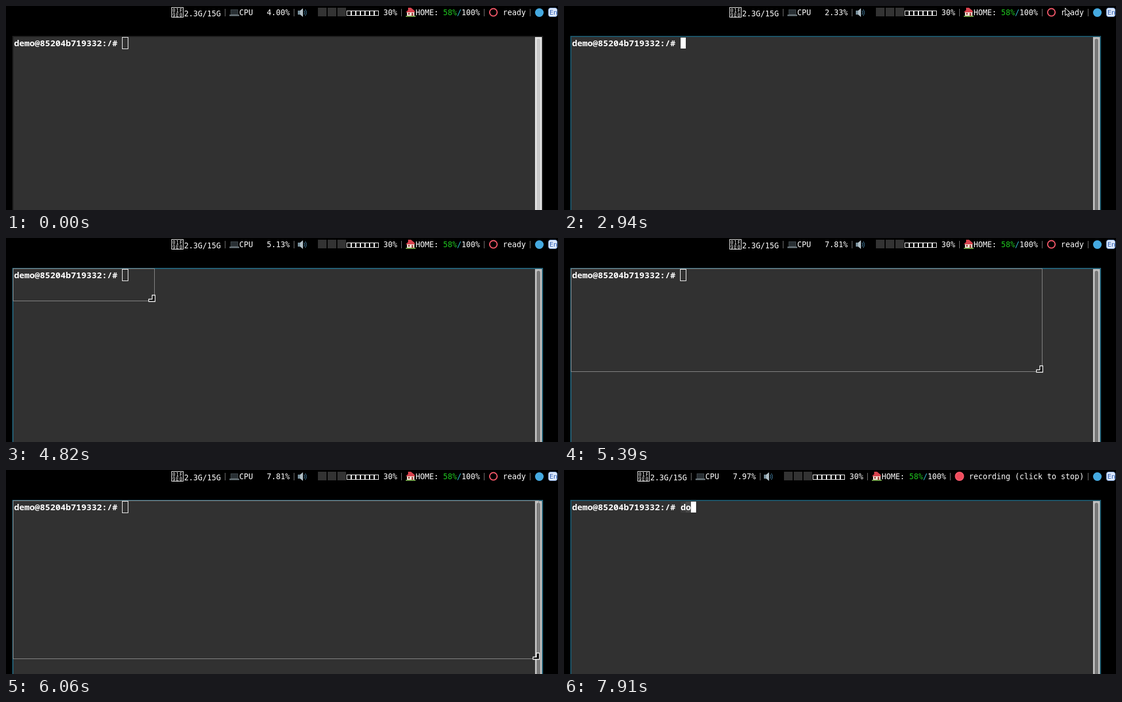
Animation, 961 px wide and 355 px high, one loop 8 s. Source, as an HTML page:

```html
<!DOCTYPE html>
<html lang="en">
<head>
<meta charset="utf-8">
<title>Terminal recording</title>
<style>
html, body { margin: 0; width: 100%; height: 100%; overflow: hidden; background: #000; }
svg { display: block; width: 961px; height: 355px; }
text { white-space: pre; fill: #fff; }
.bar { font: 13.3px "DejaVu Sans Mono", monospace; }
.hex { font: 8px "DejaVu Sans Mono", monospace; }
.term { font: 600 15px "Noto Sans Mono", monospace; }
.line { fill: none; stroke: #8a8a8a; }
</style>
</head>
<body>
<svg viewBox="0 0 961 355">
  <rect width="961" height="355"/>

  <g class="bar">
    <g id="status">
      <rect x="288.5" y="2.5" width="20" height="17" fill="none" stroke="#fff"/>
      <text class="hex" y="10.5" x="290 296 302">01F</text>
      <text class="hex" y="18.5" x="290 296 302">9E0</text>
      <text x="310" y="18">2.3G/15G</text>
      <path d="M381.5 5v13M501.5 5v13M688.5 5v13M832.5 5v13" stroke="#777"/>
      <g id="laptop">
        <path d="M391 6h13v9h-13z" fill="#3f474b"/>
        <path d="M392 7h11v7h-11z" fill="#282f33"/>
        <path d="M389 15h17v2.5h-17z" fill="#6b767c"/>
      </g>
      <text id="cpu" x="406" y="16"></text>
      <g id="speaker">
        <path d="M508 8h4v7h-4z" fill="#78909c"/>
        <path d="M512 8l5-4v15l-5-4z" fill="#b0bec5"/>
        <path d="M519 8q2 3.500 0 7M521 6q3.500 5.500 0 11" fill="none" stroke="#4a8ab0"/>
      </g>
      <path d="M543 3h15v15h-15zM560 3h15v15h-15zM577 3h15v15h-15z" fill="#333"/>
      <g id="slots" fill="none" stroke="#fff"></g>
      <text x="657" y="16">30%</text>
      <g id="house">
        <path d="M698 10h13v8h-13z" fill="#f1e4d8"/>
        <path d="M696 11l4-4v-4h5l6 5 1 3z" fill="#d8434e"/>
        <path d="M700 12h3v3h-3zM706 12h3v6h-3z" fill="#a8544c"/>
        <path d="M696 17h17v2h-17z" fill="#6d9b45"/>
      </g>
      <text x="713" y="16">HOME: <tspan fill="#1fc81f">58%</tspan><tspan fill="#35b8d0">/</tspan>100%</text>
      <circle id="dot" cx="848.5" cy="11" stroke="#f4586a" stroke-width="2"/>
      <text id="state" x="865" y="16"></text>
    </g>
    <path d="M912.500 5v13" stroke="#777"/>
    <circle cx="928.5" cy="11.500" r="7.5" fill="#45a9e0"/>
    <rect x="944.5" y="3.500" width="15" height="15" rx="3.500" fill="#dce8fb" stroke="#7fa4dc"/>
    <text x="946" y="15" style="font:11px 'DejaVu Sans',sans-serif;fill:#2f5fb3" textLength="0">En</text>
  </g>

  <rect id="frame" x="11" y="52" width="924" height="320"/>
  <rect x="13" y="54" width="920" height="320" fill="#313131"/>
  <rect id="track" x="921" y="54" width="12" height="320"/>
  <rect id="thumb" x="924" y="57" width="6" height="330" rx="3"/>
  <rect id="trail1" x="203" y="55" width="9" height="19" fill="#3b3b3b"/>
  <rect id="trail2" x="212" y="55" width="9" height="19" fill="#484848"/>
  <text id="prompt" class="term" x="14" y="70"></text>
  <rect id="block" y="55" width="9" height="19" fill="#fff"/>
  <rect id="hollow" x="202.5" y="54.5" width="10" height="20" fill="none" stroke="#fff"/>

  <path id="edges" class="line" d="M.5 22v340M960.5 22v340"/>
  <rect id="hover" x="10.5" y="51.5" width="925" height="330" fill="none" stroke="#4c7482"/>
  <rect id="select" class="line" x="12.5" y="53.5"/>

  <path id="arrow" d="M.5.5v13l3-2.700 2 4.700 2.300-1-2-4.500h4z" fill="#000" stroke="#fff"/>
  <g id="cross" fill="none">
    <path d="M-8 0H8M0-8V8" stroke="#fff" stroke-width="3"/>
    <path d="M-8 0H8M0-8V8" stroke="#000"/>
  </g>
  <path id="corner" d="M-9.500-2.500h6v-7h5v11h-11z" fill="#000" stroke="#fff" stroke-width="1.3"/>
</svg>

<script>
const LOOP = 8000;
const el = {};
document.querySelectorAll('[id]').forEach(n => el[n.id] = n);

for (let i = 0; i < 7; i++) {
  const slot = document.createElementNS('http://www.w3.org/2000/svg', 'rect');
  const box = { x: 593.5 + 8 * i, y: 8.5, width: 7, height: 8 };
  for (const k in box) slot.setAttribute(k, box[k]);
  el.slots.append(slot);
}

// [time, x, y]
const arrowPath = [
  [2190, 690, 200], [2320, 725, 168], [2500, 800, 90], [2700, 856, 24],
  [2850, 871, 5], [2940, 872, 3], [7050, 930, 363], [7180, 905, 356],
  [7350, 800, 334], [7500, 738, 321], [7590, 728, 318]
];
const crossPath = [
  [3030, 872, 6], [3140, 850, 12], [3350, 660, 36], [3600, 400, 66],
  [3870, 193.5, 86.5], [4000, 80, 68], [4140, 8, 49], [4320, 13.5, 53.5]
];
const dragPath = [
  [4580, 22, 60], [4750, 170, 92], [5000, 480, 152], [5200, 725, 206],
  [5340, 820, 227], [5390, 832, 232], [5600, 878, 272], [5850, 915, 312],
  [6060, 927, 328], [6180, 928, 346], [6460, 929, 355], [6660, 930, 362],
  [6860, 930, 362], [6910, 930, 364]
];
const loads = [
  [0, '4.00'], [300, '3.52'], [1300, '4.27'], [2290, '2.33'], [3260, '3.84'],
  [4230, '5.13'], [5180, '7.81'], [6140, '9.34'], [7130, '7.97']
];

const within = (t, a, b) => t >= a && t < b;
const show = (node, on) => node.style.display = on ? '' : 'none';
const set = (node, attrs) => { for (const k in attrs) node.setAttribute(k, attrs[k]); };
const write = (node, s) => { if (node.textContent !== s) node.textContent = s; };
const place = (node, [x, y]) => node.setAttribute('transform', `translate(${x} ${y})`);

function along(path, t) {
  const i = path.findIndex(p => p[0] > t);
  if (i < 0) return path.at(-1).slice(1).map(Math.round);
  if (i === 0) return path[0].slice(1);
  const [a, b] = [path[i - 1], path[i]];
  const k = (t - a[0]) / (b[0] - a[0]);
  return [1, 2].map(j => Math.round(a[j] + (b[j] - a[j]) * k));
}

function mix(a, b, k) {
  return `rgb(${a.map((v, i) => Math.round(v + (b[i] - v) * k))})`;
}

function drawBar(t) {
  const recording = t >= 7180;
  place(el.status, [recording ? -160 : 0, 0]);
  write(el.state, recording ? 'recording (click to stop)' : 'ready');
  set(el.dot, { r: recording ? 7 : 6.5, fill: recording ? '#ef4c5c' : 'none' });
  const load = loads.filter(([at]) => at <= t).at(-1)[1];
  write(el.cpu, `CPU   ${load}%`);
}

function drawWindow(t) {
  const focus = Math.min(1, Math.max(0, (t - 90) / 220));
  const k = t < 130 ? 0 : focus;
  const picking = within(t, 3030, 7050);
  set(el.frame, { fill: mix([30, 30, 30], picking ? [36, 98, 120] : [28, 86, 106], k) });
  set(el.track, { fill: mix([226, 226, 226], [192, 192, 192], k) });
  set(el.thumb, { fill: mix([200, 200, 200], [120, 120, 120], k) });

  const typed = t >= 7910 ? 'do' : t >= 7820 ? 'd' : '';
  write(el.prompt, 'demo@85204b719332:/# ' + typed);
  show(el.trail1, t >= 7820);
  show(el.trail2, t >= 7910);

  const hollow = t < 130 || picking;
  const blinkOff = within(t, 700, 1300) || within(t, 1890, 2490);
  show(el.hollow, hollow);
  show(el.block, !hollow && !blinkOff);
  set(el.block, { x: 203 + 9 * typed.length });
}

function drawPointer(t) {
  const pointing = within(t, 2190, 3030) || within(t, 7050, 7820);
  const aiming = within(t, 3030, 4580);
  const dragging = within(t, 4580, 7050);
  show(el.arrow, pointing);
  show(el.cross, aiming);
  show(el.corner, dragging);
  show(el.select, dragging);

  if (pointing) place(el.arrow, t < 3030 && t >= 2940 ? [872, 3] : along(arrowPath, t));

  const [cx, cy] = along(crossPath, t);
  const inside = cx >= 11 && cy >= 52;
  show(el.edges, aiming && !inside);
  show(el.hover, aiming && inside);
  if (aiming) place(el.cross, [Math.floor(cx) + .5, Math.floor(cy) + .5]);

  if (dragging) {
    const [x, y] = along(dragPath, t);
    place(el.corner, [x, y]);
    set(el.select, { width: x - 12, height: y - 53 });
  }
}

function frame() {
  const t = performance.now() % LOOP;
  drawBar(t);
  drawWindow(t);
  drawPointer(t);
  requestAnimationFrame(frame);
}
frame();
</script>
</body>
</html>
```
